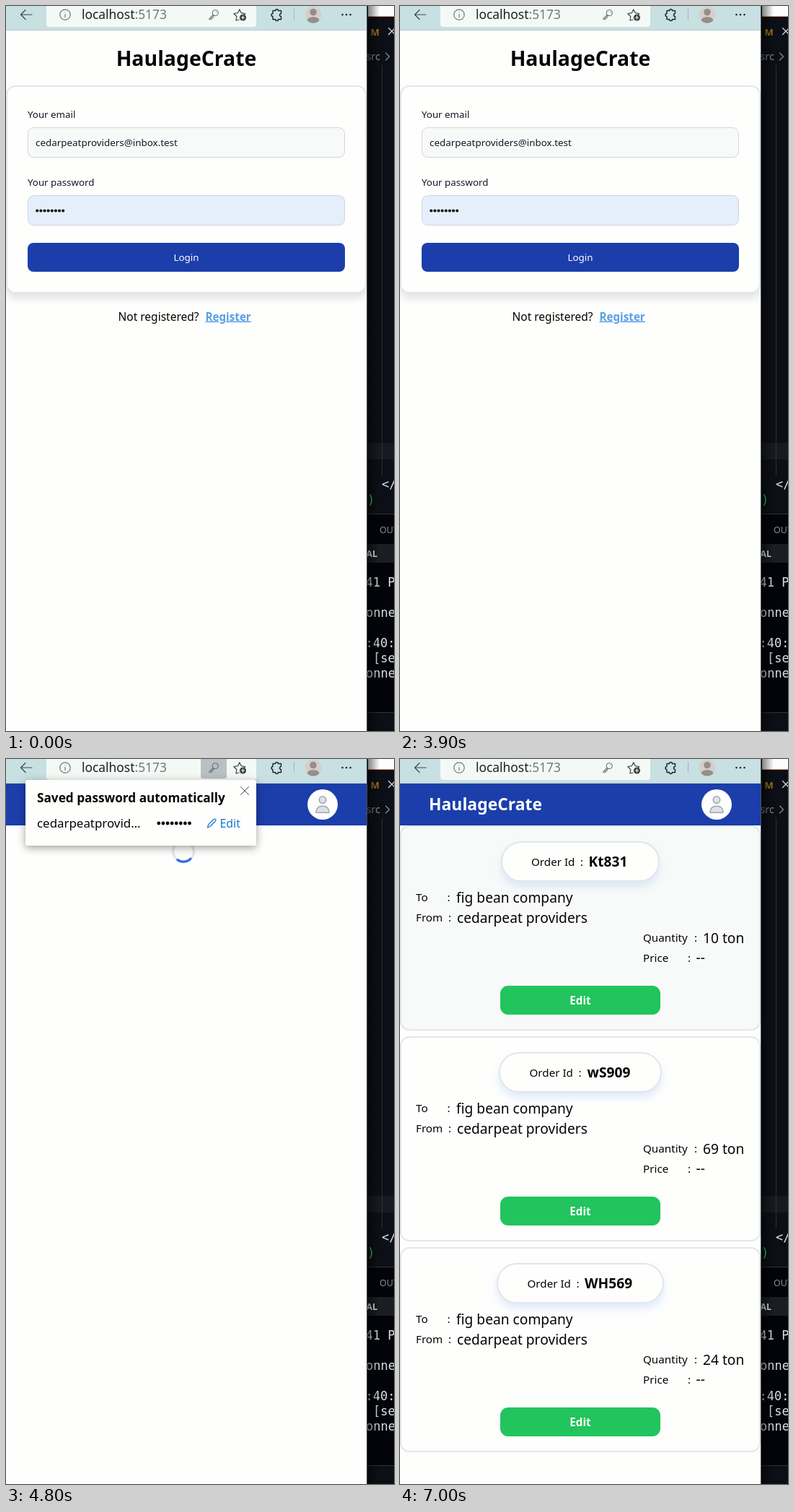
These frames come from a looping animation (538x1004 px, 8 s). An HTML page:

```html
<!DOCTYPE html>
<html lang="en">
<head>
<meta charset="utf-8">
<title>HaulageCrate</title>
<style>
html, body { margin: 0; width: 100%; height: 100%; overflow: hidden; background: #fefefd; }
svg { display: block; }
#stage { width: 100vw; height: 100vh; font-family: "Noto Sans", "Open Sans", sans-serif; font-size: 15.2px; fill: #050505; }
text { white-space: pre; }
.bold { font-weight: 700; }
.mid { text-anchor: middle; }
.big { font-size: 19.2px; }
.small { font-size: 13.4px; }
.label { font-size: 13.3px; font-weight: 500; fill: #111827; }
.white { fill: #fefefd; }
.line { fill: none; stroke: #3c4648; stroke-width: 1.2; stroke-linecap: round; stroke-linejoin: round; }
.card { fill: #fefefd; stroke: #e3e6e9; stroke-width: 2; }
.raised { filter: drop-shadow(0 7px 6px rgba(0,0,0,.11)); }
.pill { filter: drop-shadow(0 7px 6px rgba(70,140,240,.17)); }
.field { stroke: #d1d5db; }
.dots { stroke: #0a0a0a; stroke-linecap: round; }
.mono { font: 17px "DejaVu Sans Mono", monospace; fill: #dbe1e7; }
.popup-box { filter: drop-shadow(0 3px 6px rgba(0,0,0,.38)); }

/* One 8 s timeline with hard cuts */
.login, .button, .home, .spinner, .orders, .popup, .close-bg, .first { animation: 8s step-end infinite; }
.login { animation-name: login; }
.button { fill: #1b3eab; animation-name: press; }
.home { animation-name: home; }
.spinner { animation-name: spinner; }
.orders { animation-name: orders; }
.popup { animation-name: popup; }
.close-bg { animation-name: hover; }
.first { animation-name: first; }
.spin { transform-origin: 246px 128px; animation: spin 1s steps(10) infinite; }

@keyframes login { 0% { opacity: 1 } 55%, 100% { opacity: 0 } }
@keyframes press { 0% { fill: #1b3eab } 43.75% { fill: #1b4dd6 } 48.75%, 100% { fill: #1b3eab } }
@keyframes home { 0% { opacity: 0 } 55%, 100% { opacity: 1 } }
@keyframes spinner { 0% { opacity: 1 } 66.25%, 100% { opacity: 0 } }
@keyframes orders { 0% { opacity: 0 } 66.25%, 100% { opacity: 1 } }
@keyframes popup { 0% { opacity: 0 } 57.5% { opacity: .5 } 58.75% { opacity: 1 } 83.75% { opacity: .4 } 85%, 100% { opacity: 0 } }
@keyframes hover { 0% { opacity: 0 } 80%, 100% { opacity: 1 } }
@keyframes first { 0% { fill: #fefefd } 87.5%, 100% { fill: #f8faf9 } }
@keyframes spin { from { transform: rotate(-243deg) } to { transform: rotate(117deg) } }
</style>
</head>
<body>
<svg id="stage" viewBox="0 0 538 1004" preserveAspectRatio="none">
  <defs>
    <linearGradient id="shade">
      <stop offset="0" stop-color="#000" stop-opacity=".55"/>
      <stop offset="1" stop-color="#000" stop-opacity="0"/>
    </linearGradient>
    <g id="details">
      <text x="22" y="197">To</text><text x="65.5" y="197">:</text>
      <text class="big" x="78" y="199">fig bean company</text>
      <text x="22" y="225">From</text><text x="67" y="225">:</text>
      <text class="big" x="79" y="227">cedarpeat providers</text>
      <text x="337" y="253">Quantity</text><text x="408" y="253">:</text>
      <text x="337" y="281">Price</text><text x="399" y="281">:</text>
      <text class="big" x="410.5" y="282">--</text>
      <rect x="139" y="314" width="222" height="40" rx="11" fill="#21c45d"/>
      <text class="bold mid white" x="250" y="339.5">Edit</text>
    </g>
  </defs>

  <rect width="500" height="1004" fill="#fefefd"/>

  <g class="login">
    <text class="bold mid" x="250" y="82.5" font-size="28.4">HaulageCrate</text>
    <rect class="card raised" x="1" y="111" width="498" height="286" rx="12"/>
    <text class="label" x="30" y="155">Your email</text>
    <rect class="field" x="30.5" y="168.5" width="439" height="41" rx="8" fill="#f8faf9"/>
    <text class="small" x="41" y="193.5" fill="#111827">cedarpeatproviders@inbox.test</text>
    <text class="label" x="30" y="248.5">Your password</text>
    <rect class="field" x="30.5" y="262.5" width="439" height="41" rx="8" fill="#e5effb"/>
    <path class="dots" d="M43.2 283.5h36.5" stroke-width="4.2" stroke-dasharray="0 5.14"/>
    <rect class="button" x="30" y="328" width="440" height="40" rx="8"/>
    <text class="small mid white" x="250" y="353" font-weight="500">Login</text>
    <text x="155.5" y="435.5" font-size="15.5">Not registered?</text>
    <text class="bold" x="276.5" y="435.5" fill="#55a0e6" text-decoration="underline">Register</text>
  </g>

  <g class="home">
    <rect y="34" width="500" height="58" fill="#1b3eab"/>
    <text class="bold white" x="40" y="71" font-size="22.9">HaulageCrate</text>
    <circle class="white" cx="439" cy="63" r="21"/>
    <g fill="#dde2e7" stroke="#9fa8b3" stroke-width="1.6">
      <circle cx="439" cy="56.5" r="4.7"/>
      <path d="M430 74.3c0-6 3.5-9 9-9s9 3 9 9z" stroke-linejoin="round"/>
    </g>

    <g class="spinner">
      <g class="spin" fill="none" stroke-width="3">
        <circle cx="246" cy="128" r="14.3" stroke="#e3e5e8"/>
        <circle cx="246" cy="128" r="14.3" stroke="#2563e0" stroke-linecap="round" pathLength="360" stroke-dasharray="80 280"/>
      </g>
    </g>

    <g class="orders">
      <rect class="card first" x="1" y="93" width="498" height="282" rx="12"/>
      <rect class="card pill" x="141" y="115" width="218" height="54" rx="27"/>
      <text x="182" y="147.5">Order Id</text><text x="250" y="147.5">:</text>
      <text class="big bold" x="261.5" y="149">Kt831</text>
      <text class="big" x="420" y="255">10 ton</text>
      <use href="#details"/>

      <g transform="translate(0 292)">
        <rect class="card" x="1" y="93" width="498" height="282" rx="12"/>
        <rect class="card pill" x="138" y="115" width="224" height="54" rx="27"/>
        <text x="179.5" y="147.5">Order Id</text><text x="247.5" y="147.5">:</text>
        <text class="big bold" x="259.5" y="149">wS909</text>
        <text class="big" x="420" y="255">69 ton</text>
        <use href="#details"/>
      </g>

      <g transform="translate(0 584)">
        <rect class="card" x="1" y="93" width="498" height="282" rx="12"/>
        <rect class="card pill" x="135" y="115" width="230" height="54" rx="27"/>
        <text x="176.5" y="147.5">Order Id</text><text x="244.5" y="147.5">:</text>
        <text class="big bold" x="256" y="149">WH569</text>
        <text class="big" x="420" y="255">24 ton</text>
        <use href="#details"/>
      </g>
    </g>
  </g>

  <!-- Browser bar -->
  <rect width="500" height="33" fill="#c8e0e1"/>
  <rect y="33" width="500" height="1" fill="#b9cfd0"/>
  <rect x="56" y="-8" width="291" height="37" rx="4" fill="#f4f9f6"/>
  <rect class="popup" x="270" y="-4" width="36" height="31" rx="3" fill="#b9c0c3"/>
  <path class="line" d="M36 12H20.5M27 5.500l-6.500 6.500 6.500 6.500" stroke="#222"/>
  <g class="line" style="stroke:#6d7778">
    <circle cx="82" cy="12" r="7.2"/>
    <path d="M82 11.500v4M82 8.500v.1"/>
    <circle cx="290.300" cy="9.500" r="4"/>
    <path d="M287.300 12.300l-5.300 5.200v1h3v-2h2v-2l2-1.500M291.700 8.200v.1"/>
  </g>
  <path class="line" d="M323 19l-4 1 .8-5.500-4-4 5.500-.8 2.500-5 2.500 5 5.500.8-1.500 1.500"/>
  <circle cx="328.500" cy="16" r="4.600" fill="#3c4648"/>
  <path d="M326 16h5M328.500 13.500v5" stroke="#f4f9f6"/>
  <path class="line" style="stroke:#1d2526;stroke-width:1.4" d="M370 6.500h3.500a2 2 0 0 1 4 0h4v4a2 2 0 0 0 0 4v4h-4a2 2 0 0 1-4 0H370v-4a2 2 0 0 1 0-4z"/>
  <path d="M399.500 4v15" stroke="#9fb3b4"/>
  <clipPath id="face"><circle cx="426" cy="12" r="11.500"/></clipPath>
  <g clip-path="url(#face)">
    <rect x="414" width="24" height="24" fill="#d5cfcb"/>
    <circle cx="426" cy="8.500" r="4.800" fill="#958e8b"/>
    <ellipse cx="426" cy="20.500" rx="8.500" ry="5.500" fill="#958e8b"/>
  </g>
  <path d="M466.500 12h12" stroke="#222" stroke-width="2.600" stroke-linecap="round" stroke-dasharray="0 5.500"/>
  <text x="105" y="18" font-size="17.4" fill="#1c2222">localhost<tspan fill="#707a7a">:5173</tspan></text>

  <!-- Editor window -->
  <svg x="500" width="38" height="1004" viewBox="500 0 38 1004">
    <rect x="500" width="38" height="1004" fill="#0c1016"/>
    <rect x="502" width="36" height="14" fill="#fdfdfc"/>
    <rect x="502" y="14" width="36" height="1" fill="#d9825f"/>
    <text class="bold" x="505.500" y="41" font-size="13" fill="#a0731d">M</text>
    <path class="line" d="M530.500 30.500l9 9m0-9l-9 9" style="stroke:#d8dde2"/>
    <text x="499.500" y="74.500" font-size="14.300" fill="#878e96">src</text>
    <path class="line" d="M526.500 65l5 5-5 5" style="stroke:#878e96"/>
    <rect x="500" y="605" width="38" height="23" fill="#171b21"/>
    <path d="M521.500 82v568" stroke="#2b3036"/>
    <text class="mono" x="521" y="668">&lt;/</text>
    <text class="mono" x="501" y="690" style="fill:#35c95a">)</text>
    <rect x="500" y="703" width="38" height="275" fill="#02040a"/>
    <rect x="500" y="703" width="38" height="1" fill="#30353b"/>
    <text x="518" y="730" font-size="12.500" fill="#858c94">OUTPUT</text>
    <rect x="500" y="745" width="38" height="26" fill="#1a1e22"/>
    <text class="bold" x="499.500" y="763" font-size="12.300" fill="#e8ecef">AL</text>
    <g class="mono">
      <text x="498.500" y="804">41 P</text>
      <text x="499" y="846">onne</text>
      <text x="498.500" y="888">:40:</text>
      <text x="509" y="909">[se</text>
      <text x="499" y="930">onne</text>
    </g>
    <rect x="500" y="978" width="38" height="1" fill="#30353b"/>
    <rect x="500" width="18" height="1004" fill="url(#shade)"/>
    <rect x="500" width="1" height="1004" fill="#4a4f52"/>
  </svg>

  <g class="popup">
    <rect class="popup-box" x="27" y="29" width="320" height="91" rx="3" fill="#fefefd"/>
    <rect class="close-bg" x="319" y="33" width="24" height="22" rx="2" fill="#e6e6e6"/>
    <path class="line" d="M325.500 38.500l11 11m0-11l-11 11" style="stroke:#4a4a4a;stroke-width:1"/>
    <text class="bold" x="43" y="60" font-size="17.200">Saved password automatically</text>
    <text x="43" y="95" font-size="16.900">cedarpeatprovid…</text>
    <path class="dots" d="M211.800 89h42.800" stroke-width="4.800" stroke-dasharray="0 6.100"/>
    <path class="line" d="M279.500 95l1-4 7.500-7.500q1.500-1 2.500 0t0 2.500l-7.500 7.500z" style="stroke:#1479cf"/>
    <text x="296.500" y="95" font-size="15.900" fill="#1479cf">Edit</text>
  </g>
</svg>
</body>
</html>
```
